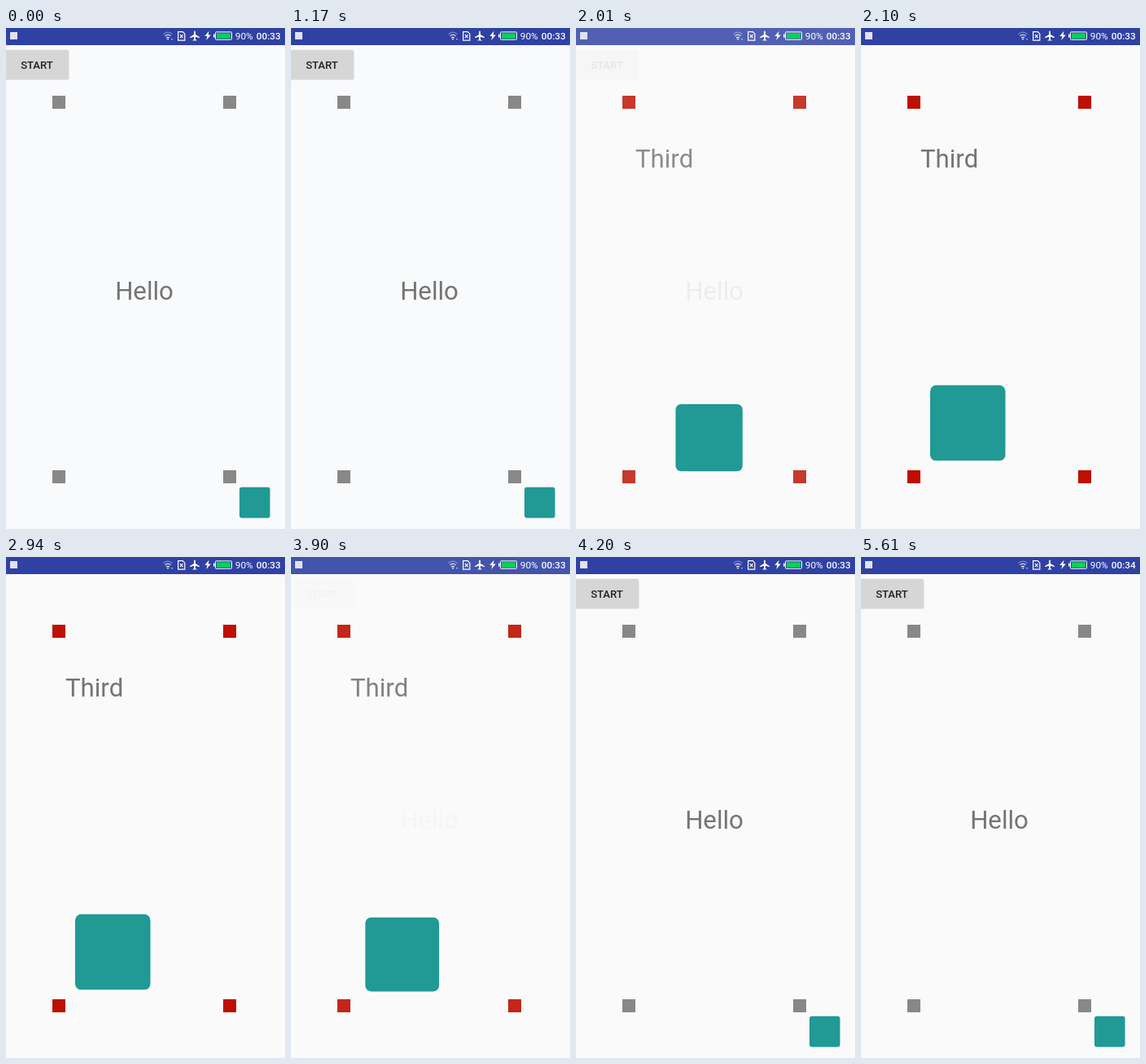
Write an HTML page that moves like this. It is 343x614 px and loops after 6000 ms.

```html
<!DOCTYPE html>
<html lang="en">
<head>
<meta charset="utf-8">
<title>Scene transition</title>
<style>
  html, body { margin: 0; width: 100%; height: 100%; overflow: hidden; background: #fafafa; }
  svg { display: block; width: 100vw; height: 100vh; }
  text { font-family: Roboto, "Liberation Sans", sans-serif; }
  .title { font-size: 31.2px; fill: #747474; }
  .status { font-size: 11.8px; fill: #fff; }
  .medium { font-weight: 500; }
</style>
</head>
<body>
<svg viewBox="0 0 343 614" preserveAspectRatio="none">
  <defs>
    <g id="corners">
      <rect x="57" y="83" width="16" height="16"/>
      <rect x="267" y="83" width="16" height="16"/>
      <rect x="57" y="542" width="16" height="16"/>
      <rect x="267" y="542" width="16" height="16"/>
    </g>
    <clipPath id="buttonShape"><rect x="-2" y="26.7" width="79" height="36" rx="2"/></clipPath>
  </defs>

  <rect id="page" width="343" height="614" fill="#fafafa"/>

  <g id="first">
    <rect x="-2" y="27.4" width="79.6" height="36.4" rx="2.4" fill="#000" opacity=".1"/>
    <rect x="-2" y="26.7" width="79" height="36" rx="2" fill="#d6d6d7"/>
    <circle id="ripple" cx="38" cy="45" r="0" clip-path="url(#buttonShape)"/>
    <text class="medium" x="38" y="49.9" font-size="13.1" text-anchor="middle" fill="#222">START</text>
    <use href="#corners" fill="#888889"/>
    <text class="title" x="170" y="332.6" text-anchor="middle">Hello</text>
  </g>

  <g id="second">
    <use href="#corners" fill="#bd1001"/>
    <text class="title" x="73" y="171.1">Third</text>
  </g>

  <rect id="tile" fill="#219995"/>

  <rect width="343" height="21" fill="#2f41a3"/>
  <rect id="barFade" width="343" height="21" fill="#fafafa"/>
  <rect x="5" y="5" width="9" height="9" fill="#dfe2f2"/>

  <g fill="none" stroke="#fff" stroke-width="1.2">
    <path d="M193.4 7.6Q199 2.6 204.6 7.6" opacity=".4"/>
    <path d="M195.3 9.9Q199 6.6 202.7 9.9" opacity=".75"/>
    <path d="M197.1 12.1Q199 10.5 200.9 12.1"/>
    <path d="M211.6 4.6h5.6l2.6 2.6v8h-8.2z"/>
    <path d="M213.9 8.2l3.6 4M217.5 8.2l-3.6 4"/>
    <rect x="257.5" y="4.9" width="20" height="9.4" rx=".8" stroke-width="1"/>
  </g>
  <g fill="#fff">
    <path d="M197.6 13.2h2.8l-1.4 1.8z"/>
    <path id="upload" d="M203 12.8l1-1.6 1 1.6z"/>
    <path id="download" d="M203 13.2h2l-1 1.6z"/>
    <path d="M231.1 4.6q.9-2 1.8 0v3.4l4.9 3v1.3l-4.9-1.5v3l1.4 1.1v.9l-2.3-.6-2.3.6v-.9l1.4-1.1v-3l-4.9 1.5v-1.3l4.9-3z"/>
    <path d="M249.6 3.8l-5.4 6.2h3.2l-1.2 5 5.6-6.6h-3.2z"/>
    <rect x="255" y="7.6" width="1.6" height="4"/>
    <rect x="259" y="6.4" width="17" height="6.4" fill="#00d451"/>
  </g>
  <text class="status" x="281.8" y="14.4">90%</text>
  <text class="status medium" id="clock" x="307.8" y="14.4">00:33</text>
</svg>
<script>
  const LOOP = 6000, STEP = 30, DURATION = 300;
  const FORWARD = 1795, BACK = 3866;
  const LEAD = 28; // fading out runs slightly ahead of fading in
  const START = { x: 287, y: 562.8, size: 37.6 };
  const END = { x: 85, y: 437.8, size: 92.5 };

  const $ = id => document.getElementById(id);
  const set = (id, attrs) => {
    for (const name in attrs) $(id).setAttribute(name, attrs[name]);
  };
  const clamp = v => Math.min(1, Math.max(0, v));
  const lerp = (a, b, k) => a + (b - a) * k;
  const ease = (t, from) => (1 - Math.cos(Math.PI * clamp((t - from) / DURATION))) / 2;

  function draw(time) {
    const t = Math.floor(time / STEP) * STEP;
    const there = ease(t, FORWARD), back = ease(t, BACK);
    const k = there - back;
    const first = 1 - ease(t, FORWARD - LEAD) + back;
    const second = there - ease(t, BACK - LEAD);

    set("first", { opacity: first });
    set("second", { opacity: second });
    set("barFade", { opacity: (1 - first) * (1 - second) });
    set("page", { fill: t < 1380 ? "#f9fafc" : "#fafafa" });

    const size = lerp(START.size, END.size, k);
    set("tile", {
      x: lerp(START.x, END.x, k),
      y: lerp(START.y, END.y, k),
      width: size, height: size, rx: size * 0.08
    });

    // Button press feedback
    const press = clamp((t - 1380) / 240);
    const release = clamp((t - 1620) / 210);
    set("ripple", { r: 45 * press, opacity: 0.07 * press * (1 - release) });

    const active = t >= 4710 && t < 5610;
    set("upload", { opacity: active ? 1 : 0 });
    set("download", { opacity: active ? 0.3 : 1 });
    $("clock").textContent = t >= 4920 ? "00:34" : "00:33";
  }

  const origin = performance.now();
  function tick() {
    draw((performance.now() - origin) % LOOP);
    requestAnimationFrame(tick);
  }
  tick();
</script>
</body>
</html>
```
